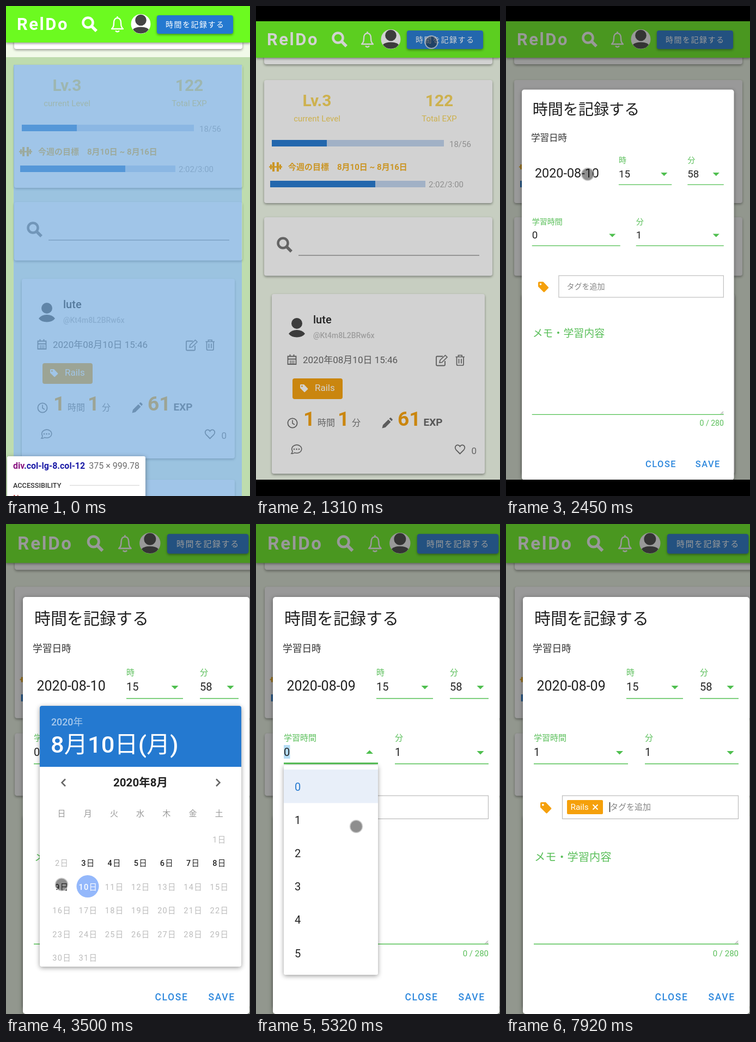
Recreate the animation shown at these times as an HTML page. Size 448 by 900 pixels, loop 8000 ms.

```html
<!DOCTYPE html>
<html lang="ja">
<head>
<meta charset="utf-8">
<title>時間を記録する</title>
<style>
html, body { margin: 0; width: 100%; height: 100%; overflow: hidden; background: #000; }
svg { display: block; width: 100vw; height: 100vh; font-family: Roboto, "Noto Sans CJK JP", "Noto Sans CJK", sans-serif; }
text { white-space: pre; }
.card { filter: drop-shadow(0 2px 2px #0006); }
.pop { filter: drop-shadow(0 2px 4px #0006); }
</style>
</head>
<body>
<svg id="stage" viewBox="0 0 448 900"></svg>
<script>
const GREEN = '#5abf5a', BLUE = '#2479d0', ORANGE = '#f5a00b', GRAY = '#6b6b6b', DARK = '#444';
const ZOOM = 1.068;

// Markup helpers
const text = (x, y, size, str, fill, weight = 400, extra = '') =>
  `<text x="${x}" y="${y}" font-size="${size}" fill="${fill}" font-weight="${weight}" ${extra}>${str}</text>`;
const rect = (x, y, w, h, fill, r = 0, extra = '') =>
  `<rect x="${x}" y="${y}" width="${w}" height="${h}" rx="${r}" fill="${fill}" ${extra}/>`;
const line = (d, color, w = 1.6, extra = '') =>
  `<path d="${d}" fill="none" stroke="${color}" stroke-width="${w}" ${extra}/>`;
const fill = (d, color, extra = '') => `<path d="${d}" fill="${color}" ${extra}/>`;
const dot = (x, y, r, color, extra = '') => `<circle cx="${x}" cy="${y}" r="${r}" fill="${color}" ${extra}/>`;
const group = (id, ...parts) => `<g id="${id}">${parts.join('')}</g>`;
const at = (x, y, s, body) => `<g transform="translate(${x} ${y}) scale(${s})">${body}</g>`;
const MID = 'text-anchor="middle"';
const spaced = n => ` letter-spacing="${n}"`;
const card = (x, y, w, h) => rect(x, y, w, h, '#fff', 4, 'class="card"');

// Icons
const lens = (x, y, color) => at(x, y, 1,
  `<circle r="9" fill="none" stroke="${color}" stroke-width="4.5"/>` + line('M7 7L15.5 15.5', color, 5.5));
const person = (x, y) => at(x, y, 1,
  dot(0, 0, 10, DARK) + fill('M-15 19Q-10 12 0 12Q10 12 15 19Q10 25.5 0 25.5Q-10 25.5-15 19z', DARK));
const tag = (x, y, s, color, hole) => at(x, y, s,
  fill('M0 2V9L10 19Q11 20 12 19L19 12Q20 11 19 10L9.5 0H2Q0 0 0 2z', color) + dot(4.6, 4.6, 1.8, hole));
const arrow = (x, y, extra = '') => fill(`M${x - 6.5} ${y - 3}h13l-6.5 6.5z`, '#4fbf4f', extra);

const header = [
  rect(0, 28, 448, 67, '#6cfa20', 0, 'class="card"'),
  text(20, 72, 31, 'RelDo', '#fff', 700, spaced(2.5)),
  lens(150.5, 58.5, '#fff'),
  line('M194 70h21c-3-3-4-5-4-11 0-6-3-9-6.5-9s-6.5 3-6.5 9c0 6-1 8-4 11zM204.5 47v3M201 73.5q3.5 3.5 7 0', '#fff', 2.4, 'stroke-linejoin="round"'),
  dot(247.5, 61, 18, '#fff'),
  dot(247.5, 54, 10.3, DARK),
  fill('M233 71Q237 66.5 247.5 66.5T262 71Q257 78.5 247.5 78.5T233 71z', DARK),
  rect(277, 45, 140, 34, BLUE, 4, 'class="card"'),
  text(293, 67, 14, '時間を記録する', '#fff', 400, spaced(1.5)),
  rect(277, 45, 140, 34, '#fff', 4, 'id="ripple"')
];

const summary = [
  card(15, 60, 419, 47),
  card(15, 136, 419, 226),
  text(112, 183.5, 30, 'Lv.3', '#f8d55a', 700, MID),
  text(336.5, 183.5, 30, '122', '#f8d55a', 700, MID),
  text(112, 212, 15, 'current Level', '#f8d55a', 400, MID),
  text(336.5, 212, 15, 'Total EXP', '#f8d55a', 400, MID),
  rect(29, 246, 316, 12, '#c2d6f0'), rect(29, 246, 101, 12, BLUE),
  text(355, 258.5, 15, '18/56', '#aaa'),
  line('M24 295.5H48', '#f5b225', 2.5), line('M27.5 291v9M44.5 291v9', '#f5b225', 3),
  line('M32 287v17M40 287v17', '#f5b225', 4),
  text(59, 301, 15, '今週の目標　8月10日 ~ 8月16日', '#f5b225', 700),
  rect(26, 321, 285, 12, '#c2d6f0'), rect(26, 321, 193, 12, BLUE),
  text(317, 332.5, 15, '2:02/3:00', '#aaa')
];

const post = [
  card(15, 388, 419, 107.5),
  lens(49.5, 435.5, '#757575'),
  line('M78 458H410', '#999', 1.3),
  card(29, 529, 391, 330), card(29, 898, 391, 100),
  person(75, 583),
  text(105, 583, 20, 'lute', '#222', 500),
  text(105, 610, 14, '@Kt4m8L2BRw6x', '#bdbdbd', 500),
  line('M58.5 643.5h15v14.5h-15zM58.5 648.5h15M62.5 640v4M69.5 640v4', GRAY, 1.8),
  line('M62 652.5h8.5M62 655.5h8.5', GRAY, 1.8, 'stroke-dasharray="2 1.2"'),
  text(86, 656, 17, '2020年08月10日 15:46', '#666'),
  line('M343 643.5H332.5Q331 643.5 331 645V659Q331 660.5 332.5 660.5H345.5Q347 660.5 347 659V652', GRAY, 1.8),
  line('M337 655l1-4.5L347.5 641.5l3.5 3.5L341.5 654.5z', GRAY),
  line('M366.5 644.5H383M371.5 644V641.5h6.5V644M368.5 645V658Q368.5 660 370.5 660H379Q381 660 381 658V645M372.5 648v8.5M377 648v8.5', GRAY, 1.7),
  rect(67, 684, 92, 38, ORANGE, 4),
  tag(81, 695, .74, '#fff', ORANGE),
  text(108, 707, 17, 'Rails', '#fff'),
  dot(67, 766, 8.6, 'none', `stroke="${GRAY}" stroke-width="1.8"`),
  line('M67 760.5v6l4 2.5', GRAY),
  text(87, 771, 37, '1', ORANGE, 700), text(113, 771, 16, '時間', '#757575'),
  text(150, 771, 37, '1', ORANGE, 700), text(176, 771, 16, '分', '#757575'),
  fill('M231.5 775.5l1.5-6L243 759.5l4.5 4.5L237.5 774zM244.5 758l1.5-1.5q1-.8 2 0l2.3 2.3q1 1 0 2L249 762.5z', GRAY),
  text(260, 771, 37, '61', ORANGE, 700), text(307.5, 771, 19, 'EXP', '#666', 700),
  line('M67 817.5A9 7.5 0 1 1 71 820.5Q68.5 822.5 65 822Q67 820 67 817.5z', GRAY),
  [70, 74.5, 79].map(x => dot(x, 814, 1.3, GRAY)).join(''),
  line('M374.5 822.5L367.5 815.5C362 809 370.5 802.5 374.5 809C378.5 802.5 387 809 381.5 815.5z', GRAY, 1.8),
  text(395.5, 823, 17, '0', '#757575')
];

const tints = [
  rect(0, 122, 448, 14, '#93c47d88'), rect(0, 136, 14, 800, '#93c47d88'), rect(433, 136, 15, 800, '#93c47d88'),
  rect(14, 136, 419, 800, '#6fa8dca8')
];

const inspector = [
  rect(2, 827, 254, 90, '#fff', 3, 'class="pop"'),
  text(13, 850, 16, '<tspan fill="#881280">div</tspan>.col-lg-8.col-12', '#1a1aa6', 700),
  text(245, 850, 16, '375 × 999.78', '#6b6b6b', 400, 'text-anchor="end"'),
  text(13, 885, 12.7, 'ACCESSIBILITY', '#333', 500),
  line('M117 880.5H245', '#ddd'),
  text(13, 909, 15, 'Name', '#a33')
];

// A select box: label, value and underline
const select = (x, end, y, label, value, id) =>
  text(x, y - 22, 15, label, GREEN) + text(x, y + 6, 20, value, '#222', 400, `id="${id}"`) +
  line(`M${x} ${y + 20.5}H${end}`, '#4fbf4f', 1.3);

const form = [
  rect(31, 134, 416, 766, '#fff', 5, 'class="pop"'),
  text(52, 184, 30, '時間を記録する', '#222', 350),
  text(49, 235, 17.7, '学習日時', '#333', 350),
  text(56.5, 306, 25, '', '#222', 400, 'id="date"'),
  select(221, 325, 300, '時', '15', 'hour'), arrow(310, 300),
  select(356, 427, 300, '分', '58', 'minute'), arrow(412, 300),
  group('focus', rect(51, 406, 11.5, 25, '#b5ddf5', 0, 'id="mark"'), line('M51 439.5H224', '#4fbf4f', 2.6)),
  select(51, 224, 420, '学習時間', '0', 'hours'), arrow(208.5, 420, 'id="caretDown"'),
  select(255, 427, 420, '分', '1', 'minutes'), arrow(412, 420),
  tag(63, 511, 1.05, ORANGE, '#fff'),
  rect(103.5, 499, 323, 42.5, '#fff', 0, 'stroke="#bbb" stroke-width="1.2"'),
  group('chip', rect(112, 507, 66, 26, ORANGE, 2), text(118.5, 525, 15.4, 'Rails', '#fff'),
    line('M159.5 515.5l9 9m0-9l-9 9', '#fff', 1.8)),
  text(119, 525, 15.4, '', '#333', 400, 'id="typed"'),
  text(119, 525, 15, 'タグを追加', '#858585', 400, 'id="hint"'),
  rect(0, 511, 1.4, 18, '#222', 0, 'id="caret"'),
  text(52, 619, 20.2, 'メモ・学習内容', GREEN, 350),
  line('M51 771.5H427', '#4fbf4f', 1.3), line('M421 770.5l5-5M424 770.5l2-2', '#777', 1),
  text(427, 794, 15, '0 / 280', GREEN, 400, 'text-anchor="end"'),
  text(273.5, 874.5, 17.5, 'CLOSE', '#2e88dd', 500, spaced(1.6)),
  text(371.5, 874.5, 17.5, 'SAVE', '#2e88dd', 500, spaced(1.6))
];

const column = i => 102 + 48.2 * i;
const days = Array.from({ length: 31 }, (_, i) => {
  const d = i + 1, cell = i + 6, open = d > 2 && d < 10;
  const color = d == 10 ? '#fff' : open ? '#222' : '#bbb';
  return text(column(cell % 7) + .7, 585 + 43.4 * Math.floor(cell / 7), 14.5, d + '日', color,
    open || d == 10 ? 500 : 400, MID + spaced(1.3));
});
const picker = [
  rect(62, 334, 370, 479, '#fff', 4, 'class="pop"'),
  fill('M62 446V338q0-4 4-4H428q4 0 4 4V446z', BLUE),
  text(83, 370, 17.8, '2020年', '#fff', 500, 'opacity=".6"'),
  text(82, 420, 43.4, '8月10日(月)', '#fff', 500),
  line('M109 468.5l-6.5 6.5 6.5 6.5M386 468.5l6.5 6.5-6.5 6.5', '#666', 2.5),
  text(247, 482, 20.5, '2020年8月', '#222', 700, MID),
  [...'日月火水木金土'].map((d, i) => text(column(i), 536.5, 15, d, '#999', 500, MID)).join(''),
  dot(150, 665.5, 20.5, '#94b8fb'),
  ...days
];

const menu = [
  rect(51, 443, 173, 385, '#fff', 3, 'class="pop"'),
  rect(51, 451, 173, 61.5, '#e8eff9'),
  ...Array.from({ length: 6 }, (_, i) => text(71, 489.5 + 61.2 * i, 20, i, i ? '#222' : BLUE))
];

stage.innerHTML =
  group('view',
    rect(0, 28, 448, 950, '#f1fae9'), ...summary, ...post, group('tint', ...tints), ...header,
    rect(0, 0, 460, 980, '#212121', 0, 'id="shade"'),
    at(0, 28, 1 / ZOOM, group('dialog', ...form, group('picker', ...picker), group('menu', ...menu)))) +
  group('bars', rect(0, 0, 448, 28, '#000'), rect(0, 870, 448, 30, '#000')) +
  group('inspector', ...inspector) +
  dot(0, 0, 11.5, '#1e1e1e80', 'id="touch" stroke="#d2d2d2b0" stroke-width="2"');

const $ = id => document.getElementById(id);
const set = (id, name, value) => $(id).setAttribute(name, value);
const show = (id, on) => set(id, 'visibility', on ? 'visible' : 'hidden');
const ramp = (t, a, b) => Math.min(1, Math.max(0, (t - a) / (b - a)));
const easeOut = p => 1 - (1 - p) ** 3;
const grow = (id, x, y, s, opacity) => {
  set(id, 'transform', `translate(${x} ${y}) scale(${s}) translate(${-x} ${-y})`);
  set(id, 'opacity', opacity);
};

// Touch point: time, x, y
const path = [
  [510, 186, 126], [890, 322, 66.5], [1650, 322, 66.5], [2060, 144, 299], [2170, 144, 299], [2450, 150, 309],
  [2760, 152, 303], [2950, 152, 303], [3450, 102, 662], [3850, 102, 662], [4400, 205, 356], [4560, 212, 415],
  [4850, 212, 415], [5320, 184, 555.5], [5700, 184, 555.5], [6380, 200, 520], [6660, 200, 520]
];
function touchAt(t) {
  const i = path.findIndex(p => p[0] > t);
  if (i < 1) return null;
  const [a, x, y] = path[i - 1], [b, u, v] = path[i], p = ramp(t, a, b), e = p * p * (3 - 2 * p);
  return [x + (u - x) * e, y + (v - y) * e];
}

function draw(t) {
  const shot = t < 100 ? 0 : t < 2760 ? 1 : 2;
  set('view', 'transform', ['translate(0 -28)', 'translate(0 0)', `scale(${ZOOM}) translate(0 -28)`][shot]);
  show('tint', shot == 0);
  show('inspector', shot == 0);
  show('bars', shot == 1);

  set('ripple', 'opacity', .42 * ramp(t, 1400, 1500) * (1 - ramp(t, 1520, 1800)));
  set('shade', 'opacity', t < 1310 ? 0 : .2 + .26 * ramp(t, 1310, 1510));
  const opened = easeOut(ramp(t, 1400, 1560));
  grow('dialog', 239, 517, .5 + .5 * opened, opened);

  const picked = t >= 3690, chosen = t >= 5640, tagged = t >= 7830;
  const pick = picked ? 0 : easeOut(ramp(t, 2760, 3010));
  grow('picker', 62, 334, pick, pick);
  const list = easeOut(ramp(t, 4770, 5020));
  grow('menu', 51, 443, list, list * (1 - ramp(t, 5640, 5900)));

  $('date').textContent = picked ? '2020-08-09' : '2020-08-10';
  $('hours').textContent = chosen ? 1 : 0;
  set('focus', 'opacity', t >= 4770 && t < 6480 ? 1 : 0);
  set('mark', 'opacity', chosen ? 0 : 1);
  set('caretDown', 'transform', t >= 4770 && !chosen ? 'rotate(180 208.5 419.5)' : 'rotate(0)');

  const count = t < 7060 || tagged ? 0 : t < 7350 ? 1 : 2 + Math.floor((t - 7350) / 95);
  $('typed').textContent = 'Rails'.slice(0, count);
  set('chip', 'opacity', tagged ? 1 : 0);
  set('hint', 'opacity', count ? 0 : 1);
  set('hint', 'x', tagged ? 191 : 119);
  set('caret', 'opacity', t >= 6480 ? 1 : 0);
  set('caret', 'x', tagged ? 189.8 : 119 + (count ? $('typed').getComputedTextLength() : 0));

  const touch = touchAt(t);
  show('touch', touch);
  if (touch) set('touch', 'transform', `translate(${touch})`);
}

const start = performance.now();
(function tick() {
  draw((performance.now() - start) % 8000);
  requestAnimationFrame(tick);
})();
</script>
</body>
</html>
```
